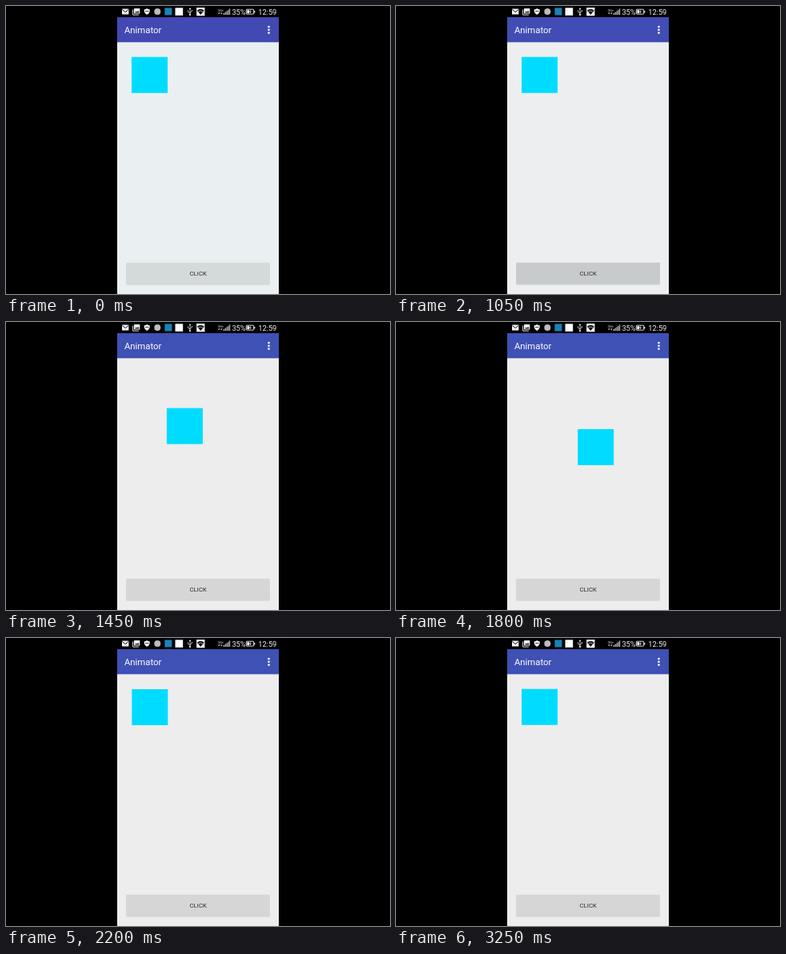
These frames come from a looping animation (480x360 px, 3750 ms). An HTML page:

```html
<!DOCTYPE html>
<html lang="en">
<head>
<meta charset="utf-8">
<title>Animator</title>
<style>
  html, body { margin: 0; width: 100%; height: 100%; overflow: hidden; background: #000; }
  svg { display: block; width: 100vw; height: 100vh; }
  text { font-family: Roboto, sans-serif; }
</style>
</head>
<body>
<svg viewBox="0 0 480 360">
  <rect width="480" height="360" fill="#000"/>
  <rect id="page" x="139" y="14" width="202" height="346"/>
  <rect id="bar" x="139" y="14" width="202" height="31.3"/>
  <text x="148" y="34.2" font-size="11.3" fill="#fff">Animator</text>
  <g fill="#fff">
    <circle cx="328.5" cy="26" r="1.3"/>
    <circle cx="328.5" cy="29.8" r="1.3"/>
    <circle cx="328.5" cy="33.6" r="1.3"/>
  </g>

  <g id="status" fill="#f2f2f2">
    <rect x="145" y="3.6" width="8.4" height="7" rx=".6"/>
    <path d="M145.4 4.6l3.8 2.9 3.8-2.9" fill="none" stroke="#000" stroke-width=".9"/>
    <path d="M158.6 4.5v6.6h7.2" fill="none" stroke="#f2f2f2" stroke-width=".9"/>
    <rect x="160" y="3" width="7.3" height="6.6" rx=".5"/>
    <path d="M161 8.6l1.7-2.2 1.2 1.2 1.3-1.8 1.4 2.8z" fill="#222"/>
    <path d="M172.7 4.2q2 0 3.5-1.2 1.5 1.2 3.5 1.2v2.6q-.5 2.8-3.5 4.2-3-1.4-3.5-4.2z"/>
    <path d="M174 6.5h4.4" stroke="#222" stroke-width=".8"/>
    <circle cx="189.3" cy="7" r="4" fill="#bdbdbd"/>
    <rect x="198.4" y="2.4" width="9" height="9" fill="#1685b9"/>
    <rect x="211.5" y="2.3" width="9.7" height="9.5" fill="#fff"/>
    <g fill="none" stroke="#f2f2f2" stroke-width=".8">
      <path d="M230 3v8M227.5 5.5v1.8l2.5 1.7M232.5 5v1.5l-2.5 1.7"/>
    </g>
    <path d="M228.8 4l1.2-2 1.2 2z"/>
    <circle cx="230" cy="11" r="1.1"/>
    <rect x="238.2" y="2" width="10.2" height="10.2" fill="#fff"/>
    <path d="M238.8 5.7q4.5-3.8 9 0l-4.5 5.4z" fill="#111"/>
    <path d="M240.2 7.2q3.1-2.4 6.2 0" fill="none" stroke="#fff" stroke-width=".6"/>
    <text x="264.6" y="6.5" font-size="4.2">3G+</text>
    <path d="M265 9.5l1.3-1.7 1.3 1.7zM268 8.5h2.6l-1.3 1.8z"/>
    <path d="M271.7 11v-2h1.2v2zM273.6 11v-3.4h1.2v3.4zM275.5 11v-4.8h1.2v4.8zM277.4 11v-6.2h1.2v6.2zM279.2 11v-7.7h1v7.7z" fill="#c8c8c8"/>
    <text x="282.4" y="10.7" font-size="9.2">35%</text>
    <rect x="300.3" y="4.2" width="9.4" height="5.9" rx=".6" fill="none" stroke="#f2f2f2" stroke-width=".9"/>
    <rect x="310.1" y="6" width="1.2" height="2.4"/>
    <rect x="301.3" y="5.2" width="2.7" height="3.9"/>
    <path d="M305.8 4.6l-2 3h1.5l-.7 2.2 2.4-3h-1.6z"/>
    <text x="315.2" y="10.7" font-size="9.3">12:59</text>
  </g>

  <rect id="box" width="45" height="45" fill="#00dcff"/>
  <rect x="150.3" y="321.6" width="179.6" height="27" rx="1" fill="#000" opacity=".12"/>
  <rect id="button" x="150.3" y="320.8" width="179.6" height="27" rx="1"/>
  <text x="240.2" y="337.3" font-size="7.8" fill="#2b2b2b" text-anchor="middle">CLICK</text>
</svg>
<script>
const LOOP = 3750, STEP = 50;
const HOME = { x: 157, y: 63.7 }, REACH = 82;
const START = 1219, PEAK = 1661, END = 2222;
const el = id => document.getElementById(id);
const [page, bar, box, button] = ["page", "bar", "box", "button"].map(el);

const ramp = (t, a, b) => Math.min(1, Math.max(0, (t - a) / (b - a)));
const ease = u => (1 - Math.cos(Math.PI * u)) / 2;
const mix = (a, b, u) => `rgb(${a.map((v, i) => Math.round(v + (b[i] - v) * u))})`;

function draw(t) {
  const shift = REACH * (ease(ramp(t, START, PEAK)) - ease(ramp(t, PEAK, END)));
  box.setAttribute("x", HOME.x + shift);
  box.setAttribute("y", HOME.y + shift);

  // The press highlight fades while the screen tint settles.
  const settle = ramp(t, 800, 1250);
  page.setAttribute("fill", mix([234, 240, 241], [237, 237, 237], settle));
  bar.setAttribute("fill", mix([67, 73, 178], [63, 81, 181], settle));
  const rest = t < 750 ? [212, 217, 217] : [183, 189, 189];
  button.setAttribute("fill", mix(rest, [214, 214, 214], settle));
}

const origin = performance.now();
function tick() {
  const t = (performance.now() - origin) % LOOP;
  draw(Math.floor(t / STEP) * STEP);
  requestAnimationFrame(tick);
}
draw(0);
requestAnimationFrame(tick);
</script>
</body>
</html>
```
